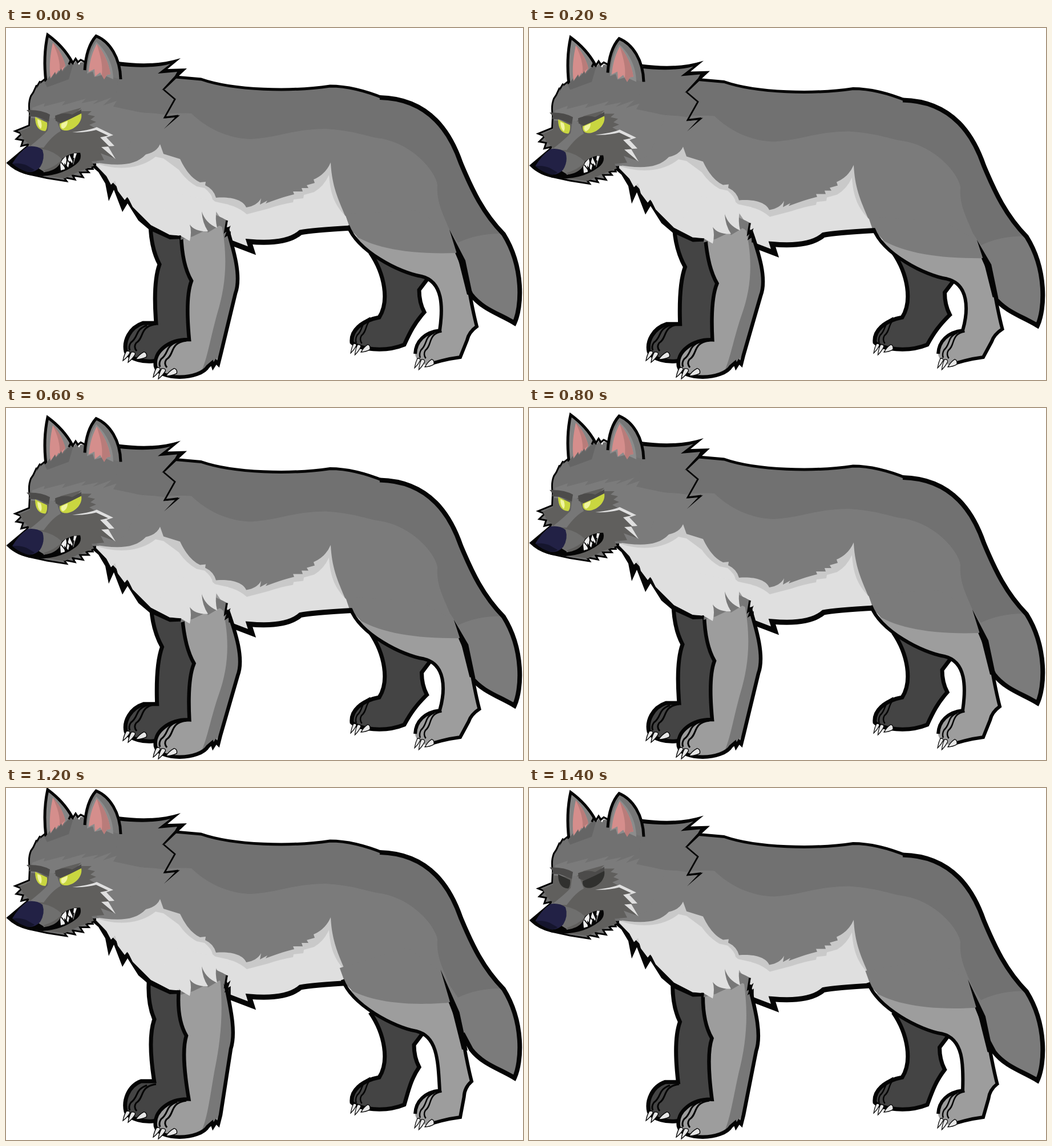
An HTML page that plays this animation: 906 px wide and 618 px high, repeating every 1.6 s.

```html
<!DOCTYPE html>
<html lang="en">
<head>
<meta charset="utf-8">
<title>Wolf idle</title>
<style>
html, body { margin: 0; width: 100%; height: 100%; overflow: hidden; background: #fff; }
svg { display: block; width: 906px; height: 618px; }
</style>
</head>
<body>
<svg id="stage" viewBox="0 0 906 618"></svg>
<script>
const NS = 'http://www.w3.org/2000/svg';
const stage = document.getElementById('stage');
const INK = '#050505', MID = '#7b7b7b', BACK = '#717171', LIGHT = '#9d9d9d',
  FAR = '#444', SHADE = '#c9c9c9', WHITE = '#dfdfdf', MASK = '#605f5d';
const STEP = 200, RISE = 4.5;
const LEVELS = [0, 1, 2, 1, 0, -1, -2, -1];
const bent = [], lifted = [];

const clamp = v => Math.max(0, Math.min(1, v));

function make(tag, attrs, parent) {
  const el = document.createElementNS(NS, tag);
  for (const name in attrs) el.setAttribute(name, attrs[name]);
  return parent.appendChild(el);
}
function group(moves) {
  const g = make('g', {}, stage);
  if (moves) lifted.push(g);
  return g;
}
function fill(parent, d, color, warp) {
  const el = make('path', { d, fill: color }, parent);
  if (warp) bent.push({ el, d, warp });
  return el;
}
function line(parent, d, width, warp) {
  const el = fill(parent, d, 'none', warp);
  el.setAttribute('stroke', INK);
  el.setAttribute('stroke-width', width);
  el.setAttribute('stroke-miterlimit', 6);
  return el;
}

// Each warp gives the shift of a point for one breathing level.
function frontWarp(x, y) {
  const low = clamp((555 - y) / 100);
  return [RISE * low * (0.25 + 0.75 * clamp((y - 345) / 65)), RISE * low];
}
function farHindWarp(x, y) {
  const w = clamp((x - 690) / 30) * clamp((556 - y) / 45);
  return [RISE * w, RISE * w];
}
function hindWarp(x, y) {
  if (y > 525 && x < 762) return [0, 0];
  const w = clamp((578 - y) / 50);
  const swing = Math.max(0, (440 - y) / 45) ** 1.6 * Math.min(1.04, Math.max(0, (x - 590) / 180));
  return [RISE * w * (1 + 0.25 * swing), RISE * (w + swing)];
}
function bend(d, warp, level) {
  return d.replace(/(-?[\d.]+)[ ,]+(-?[\d.]+)/g, (_, a, b) => {
    const [dx, dy] = warp(+a, +b);
    return (+a + dx * level).toFixed(2) + ' ' + (+b + dy * level).toFixed(2);
  });
}

function claw(parent, bx, by, tx, ty, half) {
  const len = Math.hypot(tx - bx, ty - by);
  const nx = (by - ty) / len * half, ny = (tx - bx) / len * half;
  const el = fill(parent, `M${bx + nx} ${by + ny} Q${(bx + tx) / 2 + nx} ${(by + ty) / 2 + ny} ${tx} ${ty}
    Q${(bx + tx) / 2 - nx} ${(by + ty) / 2 - ny} ${bx - nx} ${by - ny} Q${bx - nx * .3 + 3} ${by - 3} ${bx + nx} ${by + ny}Z`, '#e6e6e6');
  el.setAttribute('stroke', INK);
  el.setAttribute('stroke-width', 1.4);
}
// Toe lines and claws, with the first claw tip at x, y.
function paw(x, y, sx) {
  const g = make('g', { transform: `translate(${x} ${y}) scale(${sx} 1)` }, stage);
  line(g, 'M58 -64 C28 -60 38 -40 23 -31 Q18 -24 24 -17', 3);
  line(g, 'M42 -62 C20 -54 28 -42 14 -32 Q9 -25 12 -18', 3);
  claw(g, 9, -15, 0, 0, 3.5);
  claw(g, 18, -13, 9, 3, 4);
  claw(g, 39, -11, 22, -2, 5);
}

function farLegs() {
  const g = group();
  const front = `M253 340 C253 370 258 394 269 415 C260 440 260 480 263 518 L240 518 C216 526 206 550 210 568
    C216 582 244 588 264 584 L322 560 L330 440 L318 350`;
  line(g, front, 7, frontWarp).setAttribute('fill', FAR);
  const hind = `M638 394 C664 432 672 480 654 508 C622 514 604 532 606 552 C618 564 664 570 698 556
    C708 534 716 518 733 499 Q724 482 724 460 L742 436 L720 400`;
  line(g, hind, 7, farHindWarp).setAttribute('fill', FAR);
  paw(205, 584, 1);
  paw(604, 571, .82);
}

function body() {
  const g = group(true);
  const spine = 'C780 188 745 124 660 124 C630 110 600 102 568 102 C500 112 400 110 342 90 L300 86';
  const chest = `L176 260 L184 275 L191 268 L196 286 L208 302 L213 296 L222 314 L236 328 L254 346 L287 363 L388 372
    L431 390 L427 374 C470 376 500 370 516 357`;
  fill(g, `M142 236 L162 253 L174 273 L180 304 L189 284 L204 323 L213 308 L232 338 L252 355 L287 371 L312 370
    L310 340 L160 232Z`, INK);
  fill(g, `M152 236 ${chest} L602 351 L780 400 L815 468 C835 494 865 502 891 519 C904 490 908 420 872 362
    C836 325 817 285 797 237 ${spine} L200 62 L130 60 L100 150Z`, MID);
  fill(g, `M180 136 C230 155 280 148 325 150 C350 175 390 195 430 195 C480 192 500 178 560 177 C610 180 635 191 650 193
    C710 200 752 250 756 275 C754 305 765 325 778 356 L792 377 C815 365 845 360 872 361 C836 325 817 285 797 237
    ${spine} L200 62Z`, BACK);
  fill(g, `M152 235 C190 242 225 244 245 222 Q264 218 270 204 L276 221 L305 230 Q320 262 340 271 L350 270 L349 276
    Q364 283 368 298 C396 296 415 302 421 315 Q440 312 447 299 L445 310 L458 303 L455 308 Q490 295 505 292 L503 287
    L520 287 L518 281 L530 281 L527 276 L541 272 L539 266 Q560 257 569 236 C571 280 584 304 594 329
    L603 352 L390 372 L254 340Z`, SHADE);
  fill(g, `M154 236 C200 254 240 244 262 226 L276 229 L303 249 Q316 268 334 278 L348 281 Q361 292 362 301 L370 308
    Q400 308 422 327 Q445 321 460 317 Q480 310 503 306 L504 301 L521 299 L522 293 L540 288 Q557 278 566 258
    C568 290 576 312 596 331 L603 352 L516 357 C500 370 470 376 427 374 L431 390 L388 372 L287 363 L254 346
    L236 328 L222 314 L213 296 L208 302 L196 286 L191 268 L184 275 L176 260Z`, WHITE);
  line(g, 'M384 373 L431 391 L426 375 C470 379 500 373 516 359 Q535 355 606 351', 9);
  line(g, 'M297 86 L342 90 C400 110 500 112 568 102 C600 102 630 110 664 124', 5);
  line(g, `M655 122 C745 124 780 188 797 237 C817 285 836 325 872 362 C908 420 904 490 891 518
    C865 502 835 494 815 468 L800 440`, 8);
}

function nearHind() {
  const g = group();
  fill(g, 'M594 326 L604 354 L640 394 L760 410 L790 398 L778 356 L720 320Z', MID, hindWarp);
  fill(g, `M604 360 C640 385 700 398 790 395 L806 432 C812 460 816 490 825 524 L808 548 L796 578 L740 592
    C722 590 714 576 718 566 C720 548 734 534 758 530 C764 490 766 445 728 436 C680 426 630 400 604 360Z`, LIGHT, hindWarp);
  line(g, 'M599 347 C616 392 690 430 728 436 C766 445 766 490 760 531 C734 534 718 550 717 572', 6, hindWarp);
  line(g, 'M790 394 L806 432 C812 460 816 490 825 524 Q811 534 808 548 L796 578 Q765 582 738 592', 6, hindWarp);
  fill(g, 'M777 354 L805 408 L818 470 L808 468 L790 396Z', INK, hindWarp);
  paw(716, 597, .82);
}

function nearFront() {
  const g = group();
  const edge = `M307 364 C308 398 314 425 325 444 C315 470 318 515 321 547 C286 546 258 568 262 594
    C268 620 340 618 354 594 L361 588 L363 594 L368 586 L372 590 L376 574 L402 466 C413 436 399 390 387 350`;
  fill(g, edge + ' L360 310 L310 330Z', LIGHT, frontWarp);
  fill(g, 'M377 340 C389 400 386 450 370 502 C358 545 353 580 342 604 L361 588 L376 574 L402 466 C413 436 399 390 387 350Z', '#787878', frontWarp);
  line(g, edge, 6.5, frontWarp);
  paw(258, 613, 1);
}

function chestFur() {
  const g = group(true);
  fill(g, 'M306 372 L327 366 L350 355 L354 359 L374 347 Q382 350 384 358 L389 338 L350 320 L310 340Z', '#787878');
  fill(g, `M256 346 L287 363 L298 357 L308 366 L322 374 Q326 358 322 345 Q331 358 354 357 Q344 342 343 322
    Q349 342 370 351 Q366 335 369 318 Q375 333 388 338 L390 310 L300 290Z`, WHITE);
  line(g, 'M387 338 L384 357 L390 352 L386 364 L392 360 L392 372', 3.5);
}

function ears(g) {
  const left = 'M70 94 C66 60 68 35 73 12 C88 23 104 38 116 60';
  line(g, left, 5).setAttribute('fill', '#858585');
  fill(g, 'M82 26 C78 45 75 65 78 88 L84 80 L86 84 L92 74 L96 79 L104 66 C100 50 92 36 82 26Z', '#d58e8c');
  fill(g, 'M82 26 C91 45 95 60 94 74 L104 66 C100 50 92 36 82 26Z', '#b97c7a');
  fill(g, 'M68 96 L77 84 L78 90 L86 77 L88 83 L97 71 L99 77 L108 65 L118 62 L110 90 L72 104Z', '#656565');
  const right = 'M138 74 C140 42 148 25 158 14 C182 24 200 52 201 90';
  line(g, right, 5).setAttribute('fill', '#777');
  fill(g, 'M158 24 C146 42 144 60 142 80 L152 76 L155 86 L170 82 L188 90 C188 62 174 38 158 24Z', '#8c8c8c');
  fill(g, 'M159 28 C148 50 147 62 145 77 L155 72 L156 85 L165 78 L172 90 L177 82 L183 81 C180 60 170 40 159 28Z', '#d58e8c');
  fill(g, 'M159 28 C165 48 170 62 168 83 L172 90 L177 82 L183 81 C180 60 170 40 159 28Z', '#b97c7a');
}

let openEyes, shutEyes;
function head() {
  const g = group(true);
  const eyes = ['M51 156 L72 166 Q73 176 69 181 C57 181 51 172 51 156Z', 'M94 168 Q113 160 132 150 C135 166 118 181 103 180 Q93 179 94 168Z'];
  const profile = `M70 90 L60 98 L61 94 L54 106 L55 101 L49 114 L45 120 Q40 132 43 150 L42 172 L20 181 L30 185 L21 194
    L32 196 L29 205 L42 202 L38 209 L5 237 Q18 250 40 255 L72 262 L103 267 L98 260 L118 264 L114 257 L132 260
    L127 252 L142 252 L137 246 L150 246 L147 238 L158 238`;
  fill(g, 'M196 64 C240 67 270 65 298 57 L272 78 L308 73 L275 108 L296 126 L278 152 L180 140Z', BACK);
  fill(g, `M196 59 C235 64 270 64 306 53 L283 72 L317 71 L302 85 L279 107 L273 109 L296 84 L300 77 L266 80 L288 63
    C262 70 230 70 196 66Z`, INK);
  line(g, 'M276 108 L296 125 L278 157 L302 154', 2.8);
  fill(g, 'M275 159 L305 153 L277 177 L296 157Z', INK);
  line(g, profile, 6);
  fill(g, profile + ' L180 220 L190 140 L200 62 L137 62 L132 60 L128 65 L123 57 L119 63 L113 59Z', BACK);
  ears(g);
  line(g, 'M110 64 L113 58 L117 62 L122 54 L126 60 L131 56 L139 60', 3.5);
  fill(g, `M46 140 L68 132 L66 138 L104 128 L98 136 L140 124 L132 132 L162 126 L152 134 L185 122 L170 136 L194 128
    L188 138 L240 149 L210 220 L160 238 L150 172 L80 172 L44 158Z`, MID);
  fill(g, `M44 158 L80 162 L96 150 L132 140 L126 146 L150 146 L143 152 L156 155 L148 161 L158 165 L146 170 L160 178
    L183 188 L172 194 L185 208 L174 210 L188 228 L166 220 L172 232 L150 234 L154 242 L128 252 L103 264
    L72 260 L42 206 L30 194 L24 182 L42 174Z`, MASK);
  fill(g, 'M76 158 L88 160 L96 181 Q82 188 66 210 L40 209 Q62 192 73 180Z', '#777');
  fill(g, 'M62 212 Q84 216 98 230 Q88 244 62 251Z', '#6f6f6e');
  fill(g, `M116 183 Q145 180 159 174 L188 188 L176 192 L190 207 L179 208 L192 230 L167 209 L181 208 L165 192
    L179 189 L158 179 Q140 184 116 183Z`, WHITE);
  fill(g, 'M36 144 Q62 143 77 152 L75 164 L54 156 L40 155 L42 150Z', '#4c4b4a');
  fill(g, 'M86 154 Q102 147 116 152 L132 143 L132 150 Q114 160 96 167 L87 163Z', '#4c4b4a');

  openEyes = make('g', {}, g);
  shutEyes = make('g', {}, g);
  for (const d of eyes) {
    fill(openEyes, d, '#c9d640');
    fill(shutEyes, d, '#30302e');
  }
  fill(openEyes, 'M55 160 L61 163 Q64 172 61 177 Q55 172 55 160Z', '#f1f5a0');
  fill(openEyes, 'M97 168 L108 163 Q108 173 100 177 Q95 175 97 168Z', '#f1f5a0');

  fill(g, 'M38 207 L1 237 Q16 252 40 258 L64 260 L66 252 L58 247 L44 225Z', INK);
  fill(g, 'M38 208 Q54 206 64 214 Q69 229 60 244 Q52 253 40 253 L32 244 L11 238 Q22 219 38 208Z', '#222145');
  fill(g, 'M11 238 Q24 236 36 241 L50 249 Q45 253 38 253 Q22 248 11 238Z', '#15152d');
  fill(g, 'M60 254 C84 252 94 244 98 230 Q112 218 130 219 Q134 231 122 240 Q98 258 64 260Z', INK);
  fill(g, 'M99 231 L105 225 L107 237 L111 222 L117 235 L119 220 L124 220 L120 232 L118 240 L112 233 L109 245 L102 237 L103 248 L96 250 L95 239Z', '#eee');
  line(g, 'M97 236 L105 246 L107 231 L116 242 L119 228', 1.8);
}

farLegs();
body();
nearHind();
nearFront();
chestFur();
head();

let shown = -1;
function draw(step) {
  if (step === shown) return;
  shown = step;
  const level = LEVELS[step], shut = step === 7;
  for (const g of lifted) g.setAttribute('transform', `translate(0 ${RISE * level})`);
  for (const p of bent) p.el.setAttribute('d', bend(p.d, p.warp, level));
  openEyes.setAttribute('visibility', shut ? 'hidden' : 'visible');
  shutEyes.setAttribute('visibility', shut ? 'visible' : 'hidden');
}
const start = performance.now();
function tick() {
  draw(Math.floor((performance.now() - start) / STEP) % LEVELS.length);
  requestAnimationFrame(tick);
}
tick();
</script>
</body>
</html>
```
